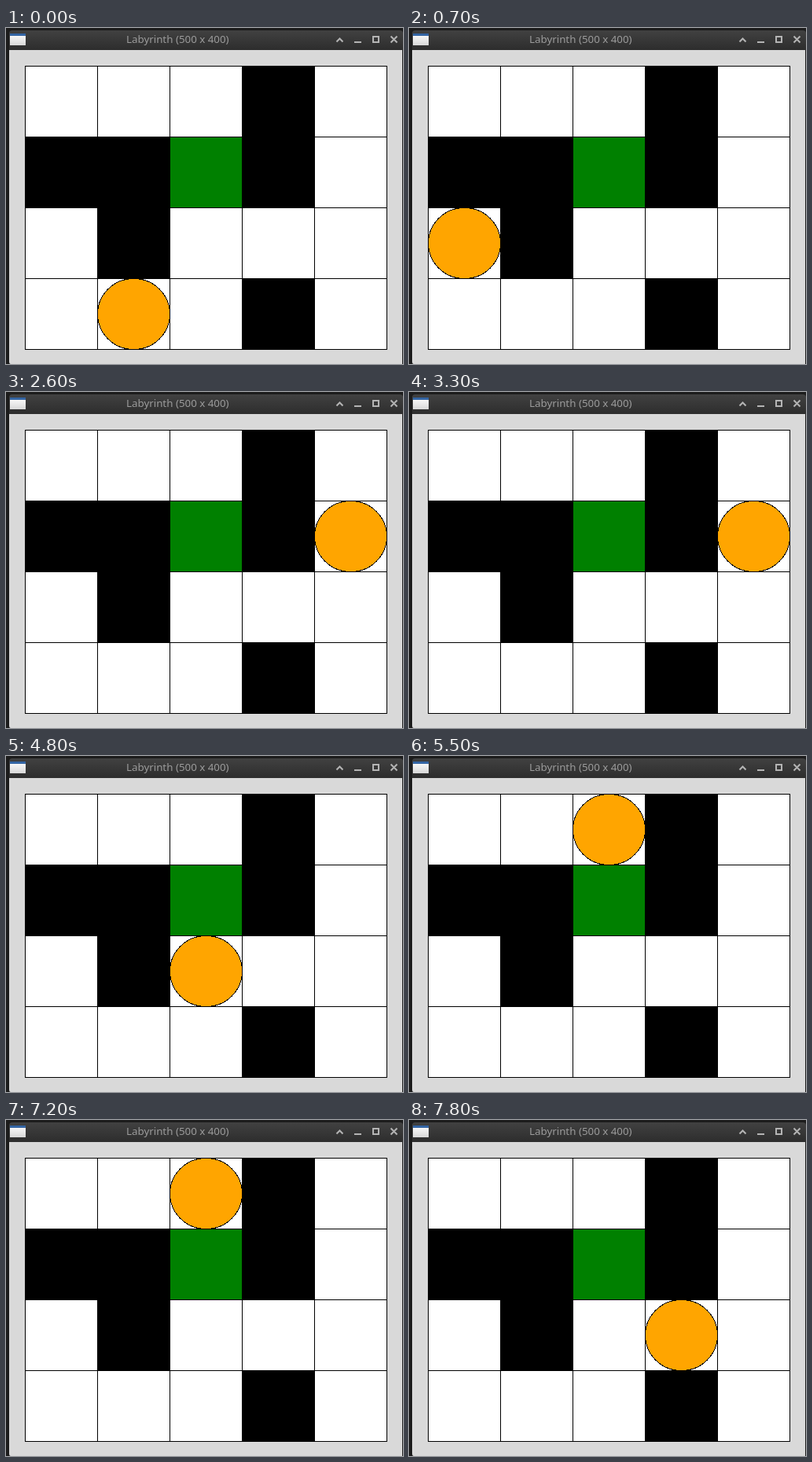
These frames come from a looping animation (505 by 427 pixels, 8000 ms). An HTML page:

```html
<!DOCTYPE html>
<html lang="en">
<head>
<meta charset="utf-8">
<title>Labyrinth</title>
<style>
  html, body { margin: 0; width: 100%; height: 100%; overflow: hidden; background: #1c1c1c; }
  svg { display: block; width: 505px; height: 427px; }
  text { font: 13.33px "Noto Sans", sans-serif; fill: #9b9b9b; }
  .cell { stroke: #000; }
</style>
</head>
<body>
<svg viewBox="0 0 505 427">
  <defs>
    <linearGradient id="bar" x2="0" y2="1">
      <stop offset="0" stop-color="#414141"/>
      <stop offset="1" stop-color="#2d2d2d"/>
    </linearGradient>
    <linearGradient id="pane" x2="0" y2="1">
      <stop offset="0" stop-color="#fff"/>
      <stop offset="1" stop-color="#d8d8d8"/>
    </linearGradient>
  </defs>
  <rect width="505" height="427" fill="#1c1c1c"/>
  <path d="M4 28V7Q4 3 8 3H501Q505 3 505 7V28Z" fill="url(#bar)"/>
  <path d="M4 28H504V427H6Q4 427 4 424Z" fill="#d9d9d9"/>
  <g shape-rendering="crispEdges">
    <rect x="5" y="7" width="20" height="15" fill="url(#pane)"/>
    <rect x="5" y="7" width="20" height="3" fill="#3465a4"/>
  </g>
  <text x="153" y="19">Labyrinth (500 x 400)</text>
  <g fill="none" stroke="#b4b4b4" stroke-width="2">
    <path d="M420.5 17.5L424.5 13.5L428.5 17.5M443 18H452M489.5 10.5L497.5 18.5M497.5 10.5L489.5 18.5"/>
    <rect x="467" y="11" width="7" height="7"/>
  </g>
  <g id="board" shape-rendering="crispEdges"></g>
</svg>
<script>
const LOOP = 8000, CELL_W = 92, CELL_H = 90, LEFT = 24.5, TOP = 48.5;
const MAZE = ["...#.", "##G#.", ".#...", "...#."];
const FILL = { ".": "#fff", "#": "#000", "G": "#008000" };
const GOAL = "21";

// Each move: time in units of 100 ms, then column and row as two digits.
const MOVES = `0:13 3:03 7:02 9:03 10:13 12:23 14:32 17:42 18:43 22:42 26:41 27:40
  31:41 32:42 33:41 37:42 38:41 46:42 47:32 48:22 52:21 55:20 56:10 57:00
  60:10 61:20 62:10 63:00 64:10 65:20 68:10 69:00 70:10 72:20 74:21 77:22 78:32`
  .split(/\s+/).map(move => {
    const [time, cell] = move.split(":");
    return { time: time * 100, cell };
  });

const board = document.getElementById("board");

function add(tag, attrs) {
  const node = document.createElementNS("http://www.w3.org/2000/svg", tag);
  for (const key in attrs) node.setAttribute(key, attrs[key]);
  return board.appendChild(node);
}

MAZE.forEach((line, row) => [...line].forEach((kind, col) => add("rect", {
  class: "cell", x: LEFT + col * CELL_W, y: TOP + row * CELL_H,
  width: CELL_W, height: CELL_H, fill: FILL[kind]
})));

const ball = add("ellipse", {
  class: "cell", rx: CELL_W / 2, ry: CELL_H / 2, fill: "#ffa500"
});

function draw(time) {
  const { cell } = MOVES.findLast(move => move.time <= time);
  // Reaching the goal clears the board until the next move.
  board.style.display = cell === GOAL ? "none" : "";
  ball.setAttribute("cx", LEFT + (+cell[0] + 0.5) * CELL_W);
  ball.setAttribute("cy", TOP + (+cell[1] + 0.5) * CELL_H);
}

const start = performance.now();
function tick() {
  draw((performance.now() - start) % LOOP);
  requestAnimationFrame(tick);
}
tick();
</script>
</body>
</html>
```
